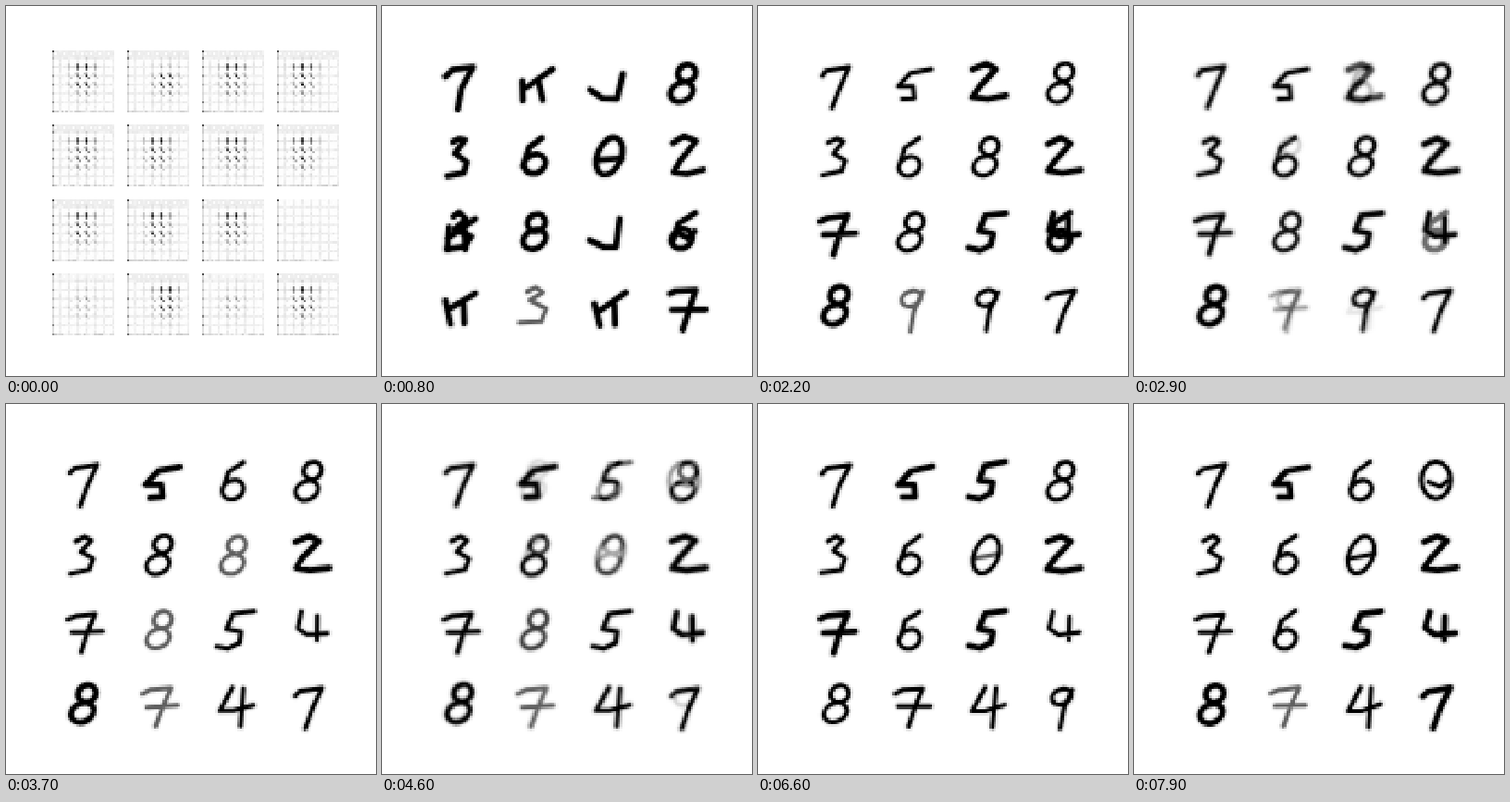
Animation of 400 by 400 pixels, one loop 8 s. Source, as an HTML page with a canvas:

```html
<!DOCTYPE html>
<html lang="en">
<head>
<meta charset="utf-8">
<title>Learning digits</title>
<style>
html, body { margin: 0; width: 100%; height: 100%; overflow: hidden; background: #fff; }
canvas { display: block; width: 400px; height: 400px; }
</style>
</head>
<body>
<canvas id="stage" width="400" height="400"></canvas>
<script>
const N = 28, SIZE = 67, STEP = 100, LOOP = 8000;
const KEYS = [0, 8, 22, 37, 55, 66, 79];
const ctx = document.getElementById("stage").getContext("2d");

function makeCanvas() {
  const c = document.createElement("canvas");
  c.width = c.height = N;
  return c;
}

function rand(seed) {
  const v = Math.sin(seed * 12.9898 + 4.137) * 43758.5453;
  return v - Math.floor(v);
}

const bump = d => Math.exp(-d * d);

const smooth = v => {
  v = Math.min(1, Math.max(0, v));
  return v * v * (3 - 2 * v);
};

// A pen collects strokes into a path and shakes every point a little.
function makePen(seed, shake) {
  const path = new Path2D();
  const near = v => v + (rand(seed++) - 0.5) * shake;
  return {
    path,
    line(...p) {
      path.moveTo(near(p[0]), near(p[1]));
      for (let i = 2; i < p.length; i += 2) path.lineTo(near(p[i]), near(p[i + 1]));
    },
    ring(x, y, rx, ry, tilt = 0) {
      const ring = new Path2D();
      ring.ellipse(near(x), near(y), rx, ry, tilt, 0, 2 * Math.PI);
      path.addPath(ring);
    }
  };
}

const shapes = {
  zero: p => p.ring(34, 35, 13, 21, 0.4),
  oh: p => p.ring(34, 35, 16, 20),
  dash: p => p.line(26, 37, 38, 41, 46, 34),
  bar: p => p.line(21, 39, 47, 34),
  two: p => p.line(20, 21, 34, 15, 45, 20, 28, 38, 20, 50, 36, 52, 56, 49),
  three: p => p.line(25, 20, 35, 15, 42, 19, 31, 31, 44, 39, 40, 51, 19, 55),
  four(p) {
    p.line(33, 17, 19, 43, 33, 43, 55, 36);
    p.line(45, 18, 41, 60);
  },
  five: p => p.line(56, 15, 33, 18, 27, 34, 42, 37, 40, 49, 28, 55, 16, 53),
  flag: p => p.line(57, 20, 34, 24, 20, 39, 37, 39, 38, 52, 25, 53),
  six(p) {
    p.line(44, 15, 28, 25, 22, 45);
    p.ring(33, 45, 12, 10, -0.5);
  },
  seven: p => p.line(19, 27, 24, 22, 49, 18, 38, 40, 30, 62),
  barred(p) {
    p.line(17, 24, 25, 20, 47, 18, 38, 39, 31, 60);
    p.line(21, 38, 55, 37);
  },
  eight(p) {
    p.ring(38, 24, 10, 9, -0.5);
    p.ring(33, 45, 13, 10, -0.5);
  },
  nine(p) {
    p.ring(35, 27, 11, 8, -0.4);
    p.line(47, 20, 38, 40, 34, 62);
  },
  hook(p) {
    p.line(26, 16, 22, 33, 32, 40, 54, 38);
    p.line(43, 21, 43, 46);
  },
  kay(p) {
    p.line(20, 32, 22, 55);
    p.line(22, 40, 53, 20);
    p.line(37, 33, 41, 54);
  },
  jay: p => p.line(14, 42, 26, 52, 41, 50, 47, 23)
};

// Poses of each cell: "!" is heavy ink, "~" is faint ink.
const cells = [
  "seven! seven seven seven seven seven",
  "kay! flag flag! flag+eight~ flag! flag!",
  "jay! two! six five five! six",
  "eight! eight eight oh+dash eight oh+dash",
  "three! three three three three three",
  "six! six eight six six six",
  "zero!+bar! eight eight~ zero zero+bar~ zero+bar",
  "two! two! two! two! two! two!",
  "kay!+three! barred! barred barred! barred! barred",
  "eight! eight eight~ eight six six",
  "jay! five! five five! five! five!",
  "six!+dash! hook!+six! hook hook! hook hook!",
  "kay! eight! eight! eight eight eight!",
  "three~ nine~ barred~ barred~ barred barred~",
  "kay! nine four four four four",
  "barred! seven seven nine nine seven!"
].map((list, n) => ({
  x: Math.round(50.2 + 80.87 * (n % 4)),
  y: Math.round(48 + 80.35 * Math.floor(n / 4)),
  poses: [drawLattice(n), ...list.split(" ").map((pose, i) => drawPose(pose, n, i))]
}));

function drawPose(pose, n, i) {
  const c = makeCanvas(), g = c.getContext("2d");
  g.scale(N / SIZE, N / SIZE);
  g.lineCap = g.lineJoin = "round";
  for (const part of pose.split("+")) {
    const pen = makePen(n * 60 + i * 9, i ? 1.5 : 5);
    const width = part.endsWith("!") ? 6.5 : 4.8;
    const alpha = part.endsWith("~") ? 0.6 : 1;
    shapes[part.replace(/\W/, "")](pen);
    g.globalAlpha = alpha * 0.1;
    g.lineWidth = width + 5;
    g.stroke(pen.path);
    g.globalAlpha = alpha;
    g.lineWidth = width;
    g.stroke(pen.path);
  }
  return c;
}

// Untrained output: a dotted lattice that repeats every four pixels.
function drawLattice(n) {
  const c = makeCanvas(), g = c.getContext("2d");
  const faint = n === 11 ? 0.06 : n === 12 || n === 14 ? 0.4 : 0.9;
  const bar = faint < 0.5 || n === 1 ? 0 : 0.85;
  const cx = n % 4 === 3 ? 11.5 : n === 1 || n === 13 ? 17 : 13.5;
  for (let y = 0; y < N; y++) {
    for (let x = 0; x < N; x++) {
      const px = x % 4, py = y % 4, r = rand(n * 997 + y * N + x);
      const side = bump((x - cx) / 5.5);
      const ink = faint * side * bump((y - 13) / 7);
      let a = 0.012 * r;
      if (px === 3 || py === 3) a += 0.035 + 0.04 * r;
      if (px === 3 && py === 3) a += ink * (0.6 + 0.4 * r);
      else if (px === 3 && py === 2) a += ink * 0.4;
      else if (px === 0 && py === 0 && y > 10) a += ink * 0.6;
      else if (px === 2 && py === 2) a += ink * 0.3;
      if (px === 3 && y > 5 && y < 9) a += bar * side * 0.6;
      else if (y === 7) a += bar * side * 0.18;
      if (y < 3 && px !== 3 && (y !== 1 || px !== 1)) a += 0.07 * faint;
      if (x === 0) a += 0.12 + (py === 3 ? 0.3 * r : 0);
      if (x + y === 0) a = 0.7;
      if (y === N - 1) a += 0.12 * r;
      g.fillStyle = `rgba(0,0,0,${Math.min(1, a)})`;
      g.fillRect(x, y, 1, 1);
    }
  }
  return c;
}

const tile = makeCanvas(), tc = tile.getContext("2d");

function drawCell(c, n, step) {
  let k = 0;
  while (k < KEYS.length - 2 && step >= KEYS[k + 1]) k++;
  const u = (step - KEYS[k]) / (KEYS[k + 1] - KEYS[k]);
  const mix = k ? smooth((u - 0.4 * rand(n * 7 + k)) / 0.6) : Math.sqrt(u);
  const wobble = 0.6 * Math.sin(Math.PI * u);
  const dx = (rand(step * 31 + n) - 0.5) * wobble;
  const dy = (rand(step * 17 + n + 400) - 0.5) * wobble;

  tc.globalCompositeOperation = "lighter";
  tc.clearRect(0, 0, N, N);
  tc.globalAlpha = 1 - mix;
  tc.drawImage(c.poses[k], k ? dx : 0, k ? dy : 0);
  tc.globalAlpha = mix;
  tc.drawImage(c.poses[k + 1], dx, dy);
  ctx.drawImage(tile, c.x, c.y, SIZE, SIZE);
}

let shown = -1;
function frame(now) {
  const step = Math.floor((now % LOOP) / STEP);
  if (step !== shown) {
    shown = step;
    ctx.fillStyle = "#fff";
    ctx.fillRect(0, 0, 400, 400);
    ctx.imageSmoothingEnabled = false;
    cells.forEach((c, n) => drawCell(c, n, step));
  }
  requestAnimationFrame(frame);
}
frame(0);
</script>
</body>
</html>
```
